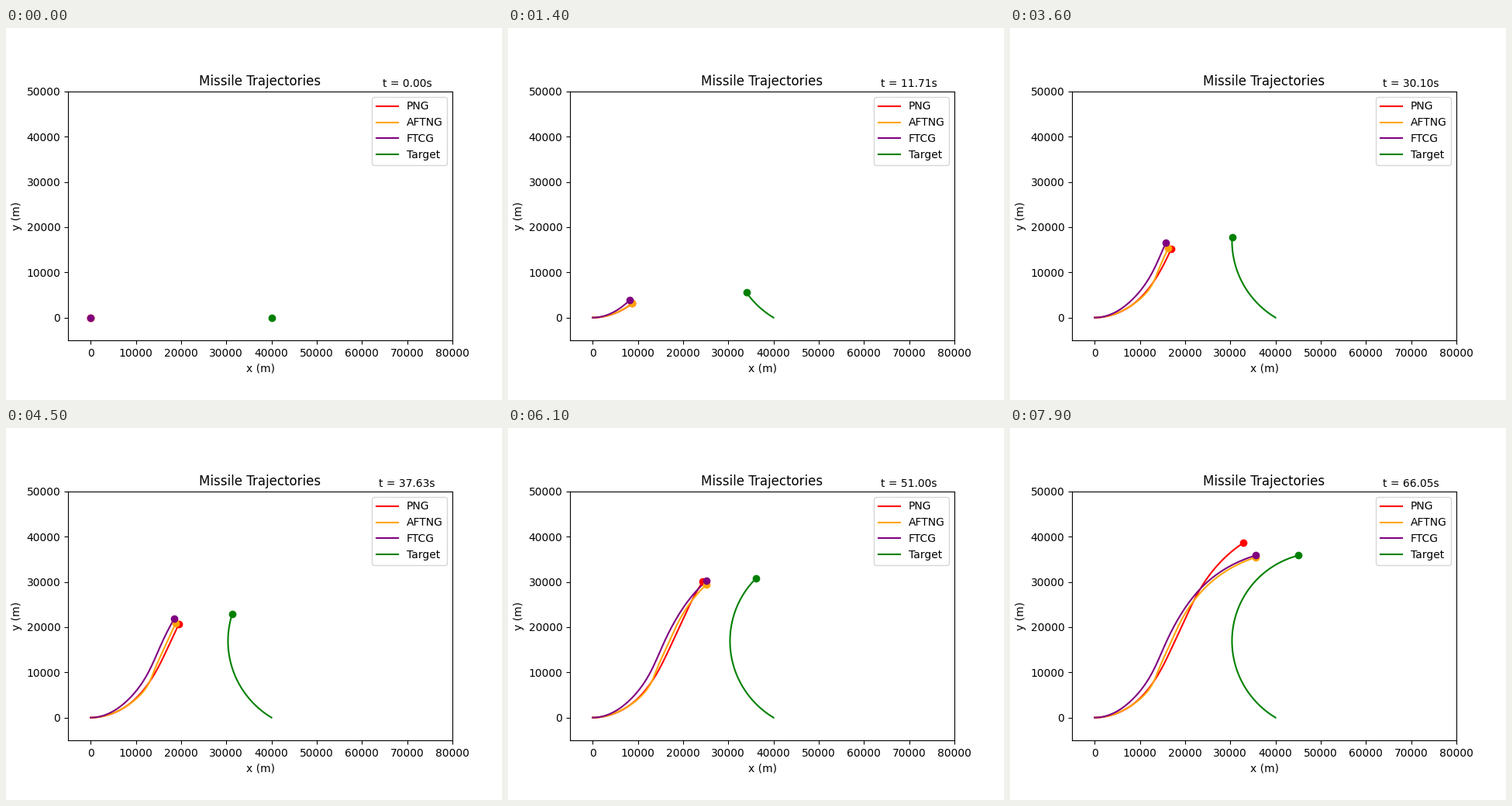
Write a matplotlib script that moves like this. It is 640x480 px and loops after 8 s.

```python
import numpy as np
import matplotlib.pyplot as plt
from matplotlib.animation import FuncAnimation

FRAMES = 80
STEP = 0.83612   # simulated seconds per frame
SUB = 8          # path samples per frame
SPEED = 0.8      # missile speed, km/s

t = np.arange((FRAMES - 1) * SUB + 1) * STEP / SUB


def spline(times, points, v0, v1):
    """Clamped cubic spline through complex points, sampled on t."""
    k, p = np.array(times), np.array(points)
    h = np.diff(k)
    d = np.diff(p) / h
    n = len(k)
    a = np.eye(n)
    b = np.zeros(n, complex)
    b[0], b[-1] = v0, v1
    for i in range(1, n - 1):
        l, r = 1 / h[i - 1], 1 / h[i]
        a[i, i - 1:i + 2] = l, 2 * (l + r), r
        b[i] = 3 * (d[i - 1] * l + d[i] * r)
    m = np.linalg.solve(a, b)
    j = np.clip(np.searchsorted(k, t, side="right") - 1, 0, n - 2)
    u = (t - k[j]) / h[j]
    w = 1 - u
    return (p[j] * w**2 * (1 + 2 * u) + p[j + 1] * u**2 * (3 - 2 * u)
            + h[j] * u * w * (m[j] * w - m[j + 1] * u))


def missile(times, points, end_heading):
    v1 = SPEED * np.exp(1j * np.radians(end_heading))
    return 1000 * spline(times, points, SPEED, v1)


def target():
    """Steady right turn with a slight loss of speed."""
    half = np.radians(2.03) * t / 2
    radius = 19.98 - 0.0048 * t
    chord = 2 * radius * np.sin(half)
    return 1000 * (40 + chord * np.exp(1j * (np.radians(149) - half)))


# waypoints in km as x + iy
times = [0, 11.71, 19.23, 30.10, 37.63, 51.00, 66.05]
png = missile(times, [0, 8.74 + 3.14j, 12.86 + 7.66j, 16.93 + 15.15j,
                      19.50 + 20.68j, 24.36 + 30.06j, 32.87 + 38.62j], 33)
aftng = missile(times[:3] + [23.51] + times[3:],
                [0, 8.79 + 3.12j, 12.82 + 7.49j, 14.16 + 10.62j,
                 16.28 + 15.37j, 18.82 + 20.86j, 25.16 + 29.42j,
                 35.53 + 35.42j], 18)
ftcg = missile(times, [0, 8.20 + 3.86j, 12.00 + 8.65j, 15.74 + 16.50j,
                       18.51 + 21.88j, 25.16 + 30.20j, 35.62 + 35.87j], 17)

tracks = [
    ("PNG", "red", png),
    ("AFTNG", "orange", aftng),
    ("FTCG", "purple", ftcg),
    ("Target", "green", target()),
]

fig, ax = plt.subplots(figsize=(6.4, 4.8), dpi=100)
ax.set_aspect("equal")
ax.set_xlim(-5000, 80000)
ax.set_ylim(-5000, 50000)
ax.set_xlabel("x (m)")
ax.set_ylabel("y (m)")
ax.set_title("Missile Trajectories")

lines = [ax.plot([], [], color=c, label=name)[0] for name, c, _ in tracks]
dots = [ax.plot([], [], "o", color=c)[0] for _, c, _ in tracks]
clock = ax.text(70000, 51000, "", ha="center")
ax.legend(loc="upper right")


def update(frame):
    end = frame * SUB
    for line, dot, (_, _, path) in zip(lines, dots, tracks):
        line.set_data(path.real[:end + 1], path.imag[:end + 1])
        dot.set_data([path.real[end]], [path.imag[end]])
    clock.set_text(f"t = {frame * STEP:.2f}s")
    return lines + dots + [clock]


anim = FuncAnimation(fig, update, frames=FRAMES, interval=100, repeat=True)
plt.show()
```
